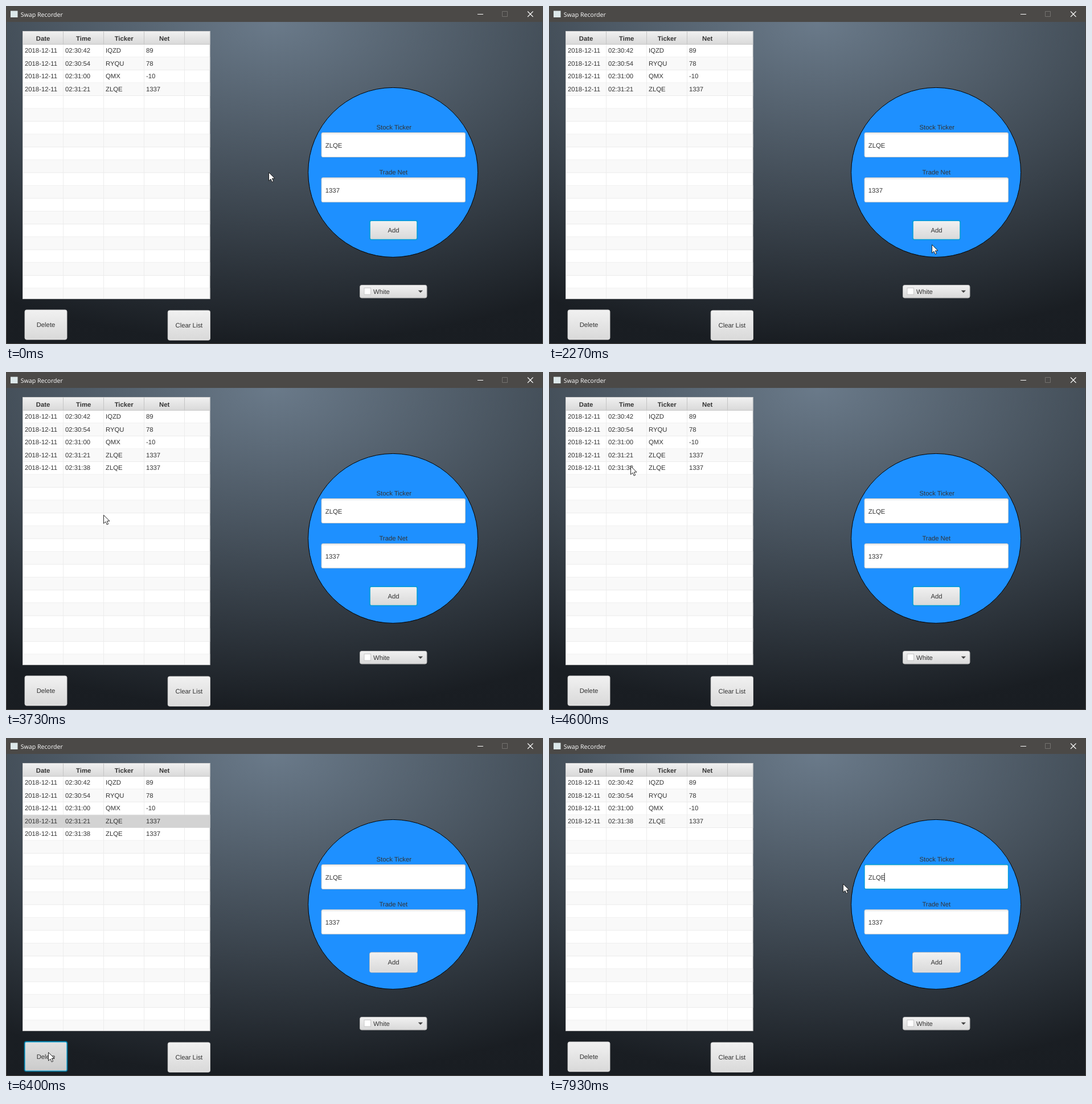
Animation of 943 by 594 pixels, one loop 8000 ms. Source, as an HTML page:

```html
<!DOCTYPE html>
<html lang="en">
<head>
<meta charset="utf-8">
<title>Swap Recorder</title>
<style>
  html, body { margin: 0; width: 100%; height: 100%; overflow: hidden; background: #4b4947; }
  #scene {
    position: absolute; left: 1px; top: 28px; width: 941px; height: 565px;
    background:
      radial-gradient(100% 100% at 50% 0, rgba(114,131,148,.9), rgba(255,255,255,0)),
      linear-gradient(#20262b, #191d22);
  }
  svg { position: absolute; left: 0; top: 0; }
  text { font: 11.3px "Liberation Sans", Arial, sans-serif; fill: #333; text-rendering: geometricPrecision; }
  .head { font-weight: bold; }
  .mid { text-anchor: middle; }
  .title { font: 10.6px "Open Sans", sans-serif; fill: #fff; }
</style>
</head>
<body>
<div id="scene"></div>
<svg width="943" height="594" viewBox="0 0 943 594">
  <defs>
    <linearGradient id="normal" x2="0" y2="1"><stop stop-color="#f1f1f1"/><stop offset="1" stop-color="#d9d9d9"/></linearGradient>
    <linearGradient id="hover" x2="0" y2="1"><stop stop-color="#fafafa"/><stop offset="1" stop-color="#e3e3e3"/></linearGradient>
    <linearGradient id="pressed" x2="0" y2="1"><stop stop-color="#e0e0e0"/><stop offset="1" stop-color="#cbcbcb"/></linearGradient>
    <linearGradient id="input" x2="0" y2="1"><stop stop-color="#ebebeb"/><stop offset=".11" stop-color="#fff"/></linearGradient>
    <clipPath id="tableClip"><rect x="29" y="44" width="329.5" height="471"/></clipPath>
  </defs>
  <g id="window"></g>
  <g id="table"></g>
  <g id="controls"></g>
  <path id="cursor" d="M.5 .5V15.2L3.9 12L6.2 17.2L8.6 16.2L6.4 11H11Z" fill="#fff" stroke="#111" stroke-width=".9"/>
</svg>
<script>
const TICK = 1000 / 15, LOOP = 8000;
const ROW = 22.56, TOP = 67.5, COLS = [29, 100.5, 171.5, 242.5, 313.5, 358.5];
const FOCUS = '#039ed3';
const $ = id => document.getElementById(id);

const rect = (x, y, w, h, fill, extra = '') =>
  `<rect x="${x}" y="${y}" width="${w}" height="${h}" fill="${fill}" ${extra}/>`;
const line = (d, color, width = 1) => `<path d="${d}" fill="none" stroke="${color}" stroke-width="${width}"/>`;
const text = (x, y, str, cls = '', extra = '') => `<text x="${x}" y="${y}" class="${cls}" ${extra}>${str}</text>`;

function button(x, y, w, h, label, { focus = false, look = 'normal' } = {}) {
  const ring = focus
    ? rect(x - .6, y - .6, w + 1.2, h + .2, 'none', `rx="3.5" stroke="${FOCUS}" stroke-opacity=".2" stroke-width="2"`) +
      rect(x + .5, y + .5, w - 1, h - 2, `url(#${look})`, `rx="2.5" stroke="${FOCUS}" stroke-width="1.3"`)
    : rect(x + .5, y + .5, w - 1, h - 1, `url(#${look})`, 'rx="3" stroke="#b7b7b7"') +
      rect(x + 1.4, y + 1.4, w - 2.8, h - 2.8, 'none', 'rx="2" stroke="#fff" stroke-opacity=".55" stroke-width=".8"');
  return ring + text(x + w / 2, y + h / 2 + 3.6, label, 'mid');
}

function field(y, value, focus, caret) {
  return rect(554, y + .5, 252.5, 43, 'url(#input)', `rx="2.5" stroke="${focus ? FOCUS : '#c3c8cc'}" stroke-width="${focus ? 1.3 : 1}"`) +
    text(560.8, y + 26.5, value) + (caret ? rect(588.6, y + 15, 1, 15.5, '#222') : '');
}

function drawWindow() {
  const chrome = rect(8, 8.5, 12.5, 11.5, '#dde8ea') + text(25.8, 18.7, 'Swap Recorder', 'title') +
    line('M828 14.5H838', '#fff') + line('M871.5 9.5H880.5V18.5H871.5Z', '#74726f') +
    line('M916 9.5L925.5 19M925.5 9.5L916 19', '#fff', 1.1);
  const circle = '<circle cx="679.6" cy="292.4" r="149" fill="#1e90ff" stroke="#000"/>';
  const picker = rect(621.5, 490.5, 117.5, 22.5, 'url(#normal)', 'rx="3" stroke="#b7b7b7"') +
    rect(629, 495.5, 11.5, 11.5, '#fff', 'stroke="#c8c8c8"') + text(645, 505.6, 'White') +
    '<path d="M723.7 499.8H732L727.9 504Z" fill="#444"/>';
  $('window').innerHTML = chrome + circle + text(681.3, 216.6, 'Stock Ticker', 'mid') +
    text(680.3, 295.8, 'Trade Net', 'mid') + picker;
}

function drawTable({ entries, selected, focus }) {
  let out = rect(29, 44, 329.5, 471, '#fff');
  for (let i = 0; i < 20; i++) {
    const y = TOP + i * ROW;
    if (i % 2) out += rect(29, y, 329.5, ROW, '#f9f9f9');
    out += line(`M29 ${y + ROW - .2}H358.5`, '#e9e9e9', .9);
  }
  out += line(COLS.slice(1, 5).map(x => `M${x} 67V515`).join(''), '#ececec');
  if (selected >= 0) {
    const y = TOP + selected * ROW;
    out += rect(29, y, 329.5, ROW, focus ? '#0096c9' : '#d3d3d3');
    if (focus) out += rect(30.7, y + 1.3, 326, ROW - 2.6, 'none', 'stroke="#5fc0e2" stroke-width=".8"') +
      line(COLS.slice(1, 5).map(x => `M${x} ${y}v${ROW}`).join(''), '#2aa8d4');
  }
  entries.forEach((entry, i) => ['2018-12-11', ...entry].forEach((cell, c) => {
    out += text([33, 104, 175, 246][c], 82.2 + i * ROW, cell, '',
      i === selected && focus ? 'style="fill:#fff"' : '');
  }));
  out += rect(29, 44, 329.5, 23.5, 'url(#normal)') + line('M29 67.3H358.5', '#c4c4c4', .9) +
    line(COLS.slice(1, 5).map(x => `M${x} 44.5V67`).join(''), '#c4c4c4');
  ['Date', 'Time', 'Ticker', 'Net'].forEach((name, i) => out += text([65, 136.2, 207.2, 278.2][i], 60.8, name, 'head mid'));
  const border = focus
    ? rect(29.2, 44.2, 329, 470.6, 'none', `stroke="${FOCUS}" stroke-width="1.7"`)
    : rect(29.5, 44.5, 328.5, 470.2, 'none', 'stroke="#c8c8c8" stroke-width=".8"');
  $('table').innerHTML = `<g clip-path="url(#tableClip)">${out}</g>${border}`;
}

function drawControls({ focused, addLook, deleteLook, caret }) {
  const add = focused === 'add';
  $('controls').innerHTML =
    field(222, 'ZLQE', focused === 'field', caret) + field(301.2, '1337') +
    (add ? button(638.6, 376.8, 83.8, 35, 'Add', { focus: true, look: addLook })
         : button(638, 376.3, 85, 36.2, 'Add')) +
    button(32.5, 533.5, 75, 53.2, 'Delete', { focus: focused === 'delete', look: deleteLook }) +
    button(283.7, 534.5, 75.3, 53.3, 'Clear List');
}

const ENTRIES = [
  ['02:30:42', 'IQZD', '89'],
  ['02:30:54', 'RYQU', '78'],
  ['02:31:00', 'QMX', '-10'],
  ['02:31:21', 'ZLQE', '1337'],
  ['02:31:38', 'ZLQE', '1337'],
];

// Pointer tip: [tick, x, y]
const PATH = [
  [0, 461, 292], [17, 461, 292], [20, 525, 272], [22, 590, 256], [24, 615, 251], [29, 615, 251],
  [31, 634, 310], [34, 672, 419], [35, 672, 419], [37, 680, 405], [43, 680, 405],
  [44, 682, 405], [49, 682, 405], [51, 585, 380], [54, 270, 290], [56, 171, 251], [59, 139, 213], [61, 139, 213],
  [63, 138, 165], [64, 141, 144], [66, 141, 144], [69, 143, 165], [75, 143, 165], [78, 139, 151],
  [86, 139, 151], [89, 105, 390], [92, 76, 545], [93, 74, 552], [97, 74, 552], [99, 177, 486],
  [102, 537, 345], [104, 615, 284], [106, 637, 257], [112, 637, 257], [116, 496, 256],
  [117, 496, 256], [119, 516, 256], [120, 516, 256],
];

function pointer(tick) {
  const i = PATH.findIndex(p => p[0] > tick);
  const [t0, x0, y0] = PATH[i - 1], [t1, x1, y1] = PATH[i];
  const k = (tick - t0) / (t1 - t0);
  return [x0 + (x1 - x0) * k, y0 + (y1 - y0) * k];
}

function stateAt(tick) {
  const focused = tick < 74 ? 'add' : tick < 94 ? 'table' : tick < 112 ? 'delete' : 'field';
  const entries = tick < 49 ? ENTRIES.slice(0, 4) : tick < 97 ? ENTRIES : ENTRIES.filter((_, i) => i !== 3);
  const selected = tick < 74 || tick >= 97 ? -1 : tick < 83 ? 4 : 3;
  const [x, y] = pointer(tick);
  const over = (l, t, r, b) => x > l && x < r && y > t && y < b;
  const look = (hit, down) => down ? 'pressed' : hit ? 'hover' : 'normal';
  return {
    table: { entries, selected, focus: focused === 'table' },
    controls: {
      focused, caret: tick >= 119,
      addLook: look(over(639, 377, 722, 411), tick >= 47 && tick < 49),
      deleteLook: look(over(33, 534, 107, 586), tick >= 94 && tick < 97),
    },
  };
}

const shown = {};
function update(name, state, draw) {
  const key = JSON.stringify(state);
  if (shown[name] !== key) { shown[name] = key; draw(state); }
}

const start = performance.now();
function render(now) {
  const t = Math.max(0, now - start) % LOOP;
  const tick = Math.min(119, Math.floor((t + 4) / TICK));
  const state = stateAt(tick);
  update('table', state.table, drawTable);
  update('controls', state.controls, drawControls);
  $('cursor').setAttribute('transform', `translate(${pointer(tick)})`);
  requestAnimationFrame(render);
}

drawWindow();
render(start);
</script>
</body>
</html>
```
